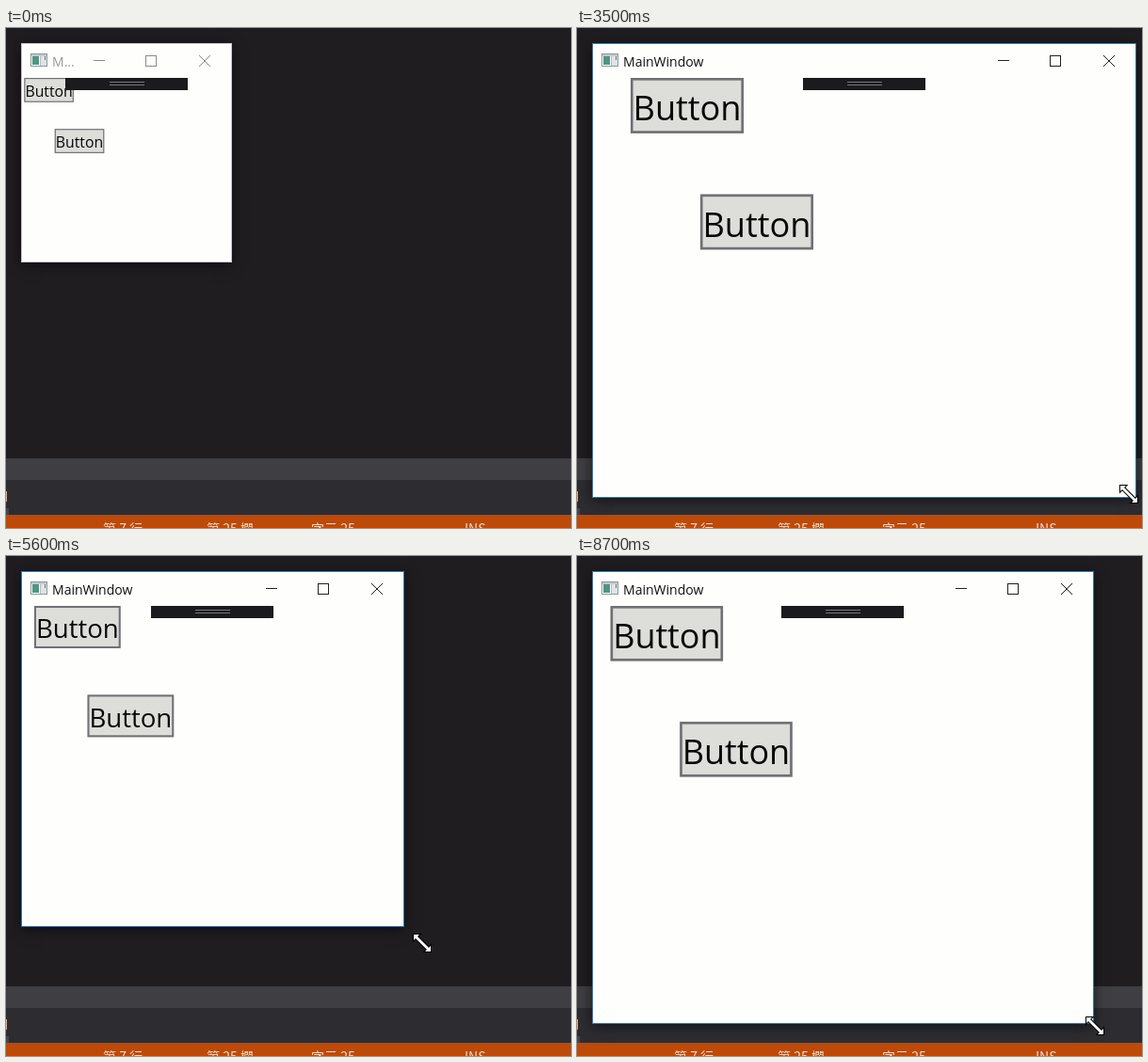
An HTML page with a canvas for the animation above (8.8 s loop, 600 px wide and 531 px high).

```html
<!DOCTYPE html>
<html lang="en">
<head>
<meta charset="utf-8">
<title>Scaling window</title>
<style>
  html, body { margin: 0; width: 100%; height: 100%; overflow: hidden; background: #1f1d20; }
  canvas { display: block; }
</style>
</head>
<body>
<canvas id="stage" width="600" height="531"></canvas>
<script>
const ctx = document.getElementById('stage').getContext('2d');
const LOOP = 8800, STEP = 100, GRAB = 1900;
const LEFT = 16, TOP = 16, CONTENT_TOP = 53;
const FONT = '"Open Sans", "Noto Sans", sans-serif';

// Lower right window corner while it is dragged: [ms, x, y]
const corner = [
  [1900, 239, 248], [2200, 262, 268], [2400, 294, 294], [2500, 321, 312],
  [2800, 410, 375], [3200, 562, 478], [3500, 593, 498], [3700, 575, 486],
  [4000, 430, 392], [4300, 352, 334], [4500, 396, 368], [4600, 457, 416],
  [4800, 555, 488], [5000, 592, 512], [5100, 582, 506], [5200, 449, 411],
  [5400, 385, 362], [5700, 440, 408], [5900, 515, 470], [6100, 545, 492],
  [6200, 547, 495], [6300, 548, 496]
];

function cornerAt(t) {
  const next = corner.findIndex(k => k[0] > t);
  if (next === 0) return corner[0].slice(1);
  if (next < 0) return corner[corner.length - 1].slice(1);
  const [t0, x0, y0] = corner[next - 1], [t1, x1, y1] = corner[next];
  const p = (t - t0) / (t1 - t0);
  return [Math.round(x0 + (x1 - x0) * p), Math.round(y0 + (y1 - y0) * p)];
}

function box(color, x, y, w, h) {
  ctx.fillStyle = color;
  ctx.fillRect(x, y, w, h);
}

function frame(color, x, y, w, h, line = 1) {
  ctx.strokeStyle = color;
  ctx.lineWidth = line;
  ctx.strokeRect(x + line / 2, y + line / 2, w - line, h - line);
}

function label(text, x, y, size, color, align = 'left', font = FONT) {
  ctx.font = `${size}px ${font}`;
  ctx.fillStyle = color;
  ctx.textAlign = align;
  ctx.fillText(text, x, y);
}

function drawBackdrop() {
  box('#1f1d20', 0, 0, 600, 531);
  box('#3f3e42', 0, 457, 600, 23);
  box('#2d2c31', 0, 480, 600, 37);
  box('#d3b294', 0, 492, 1, 11);
  box('#47464a', 0, 510, 3, 7);
  box('#bd4a08', 0, 517, 600, 14);
  const cjk = '"Noto Sans CJK TC", "Noto Sans CJK", "Noto Sans CJK SC", sans-serif';
  [['第 7 行', 103], ['第 25 欄', 213], ['字元 25', 324], ['INS', 487]]
    .forEach(([text, x]) => label(text, x, 537, 14, '#f0dccd', 'left', cjk));
}

function fitTitle(text, width) {
  ctx.font = `14px ${FONT}`;
  if (ctx.measureText(text).width <= width) return text;
  while (text.length > 1 && ctx.measureText(text + '...').width > width) text = text.slice(0, -1);
  return text + '...';
}

function drawTitleBar(right, active) {
  frame('#8d9799', 26, 27, 18, 14);
  box('#c3cacc', 27, 28, 16, 2);
  box('#4f9583', 28, 30, 7, 9);
  box('#b5bdc0', 36, 30, 1, 10);
  box('#dfe4e5', 37, 30, 6, 10);
  box('#68757a', 41, 30, 1, 4);

  label(fitTitle('MainWindow', right - 166 - 49), 49, 41, 14, active ? '#111' : '#999');

  const ink = active ? '#222' : '#8c8c8c';
  box(ink, right - 146, 34, 12, 1);
  frame(ink, right - 91, 29, 12, 12);
  ctx.beginPath();
  ctx.moveTo(right - 34, 29);
  ctx.lineTo(right - 22, 41);
  ctx.moveTo(right - 22, 29);
  ctx.lineTo(right - 34, 41);
  ctx.stroke();
}

function drawButton(x, y) {
  box('#dddeda', x, y, 40.6, 19.9);
  frame('#707174', x, y, 40.6, 19.9, 0.9);
  label('Button', x + 20.3, y + 15.2, 12.2, '#080808', 'center');
}

function drawWindow(right, bottom, active) {
  ctx.save();
  ctx.shadowColor = 'rgba(0, 0, 0, .6)';
  ctx.shadowBlur = 14;
  ctx.shadowOffsetY = 3;
  box('#fefefd', LEFT, TOP, right - LEFT, bottom - TOP);
  ctx.restore();
  frame(active ? '#2f75b0' : '#c9c0cc', LEFT, TOP, right - LEFT + 1, bottom - TOP + 1);
  drawTitleBar(right, active);

  // The content keeps its ratio and stays centred
  const width = right - LEFT - 1, height = bottom - CONTENT_TOP;
  const scale = Math.min(width / 167.7, height / 150.4);
  ctx.save();
  ctx.translate(LEFT + 1 + (width - 167.7 * scale) / 2, CONTENT_TOP);
  ctx.scale(scale, scale);
  drawButton(0, 0);
  drawButton(25, 41.75);
  ctx.restore();

  const bar = Math.round((LEFT + right) / 2 - 65);
  box('#1b1a1d', bar, CONTENT_TOP, 130, 13);
  box('#77767a', bar + 47, 57, 37, 1);
  box('#77767a', bar + 47, 60, 37, 1);
}

const arrow = new Path2D('M-9-9H-3L-5-7L7 5L9 3V9H3L5 7L-7-5L-9-3Z');

function drawCursor(x, y) {
  ctx.save();
  ctx.translate(x, y);
  ctx.strokeStyle = '#000';
  ctx.lineWidth = 2;
  ctx.stroke(arrow);
  ctx.fillStyle = '#fff';
  ctx.fill(arrow);
  ctx.restore();
}

function render(now) {
  const t = Math.floor((now % LOOP) / STEP) * STEP;
  const active = t >= GRAB;
  drawBackdrop();
  drawWindow(...cornerAt(t), active);
  if (active) {
    // The window trails the pointer by one step
    const [x, y] = cornerAt(t + STEP);
    drawCursor(x + 2, y + 3);
  }
}

const start = performance.now();
function tick() {
  render(performance.now() - start);
  requestAnimationFrame(tick);
}
tick();
</script>
</body>
</html>
```
